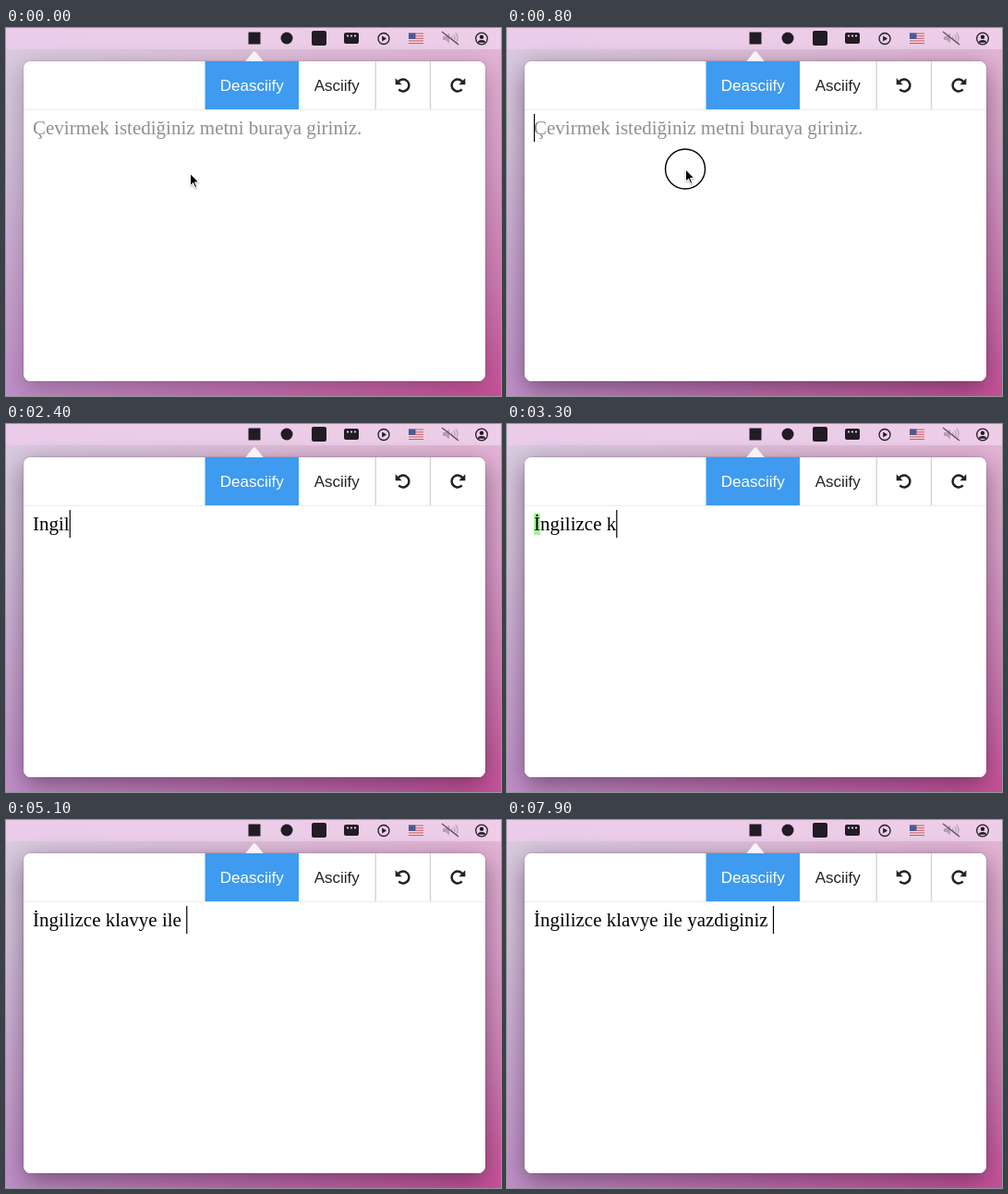
Recreate the animation shown at these times as an HTML page with a canvas. Size 536 by 398 pixels, loop 8 s.

```html
<!DOCTYPE html>
<html lang="tr">
<head>
<meta charset="utf-8">
<title>Typing demo</title>
<style>
  html, body { margin: 0; width: 100%; height: 100%; overflow: hidden; }
  #stage {
    position: relative; width: 536px; height: 398px; overflow: hidden;
    background: linear-gradient(#d9cbdf 6%, #d3c4da 30%, #c9a9d0 65%, #c08fc8);
  }
  #stage::before {
    content: ""; position: absolute; inset: 0;
    background: linear-gradient(#e3b3d4 6%, #dba0c8 35%, #d080b4 65%, #c74f96);
    -webkit-mask-image: linear-gradient(to right, transparent, #000);
    mask-image: linear-gradient(to right, transparent, #000);
  }
  canvas { position: absolute; left: 0; top: 0; width: 536px; height: 398px; }
</style>
</head>
<body>
<div id="stage"><canvas id="view"></canvas></div>
<script>
const W = 536, H = 398, LOOP = 8000;
const canvas = document.getElementById('view');
const ctx = canvas.getContext('2d');
const dpr = window.devicePixelRatio || 1;
canvas.width = W * dpr;
canvas.height = H * dpr;

const INK = '#211b23';
const SERIF = '21px "Liberation Serif", "Times New Roman", serif';
const SANS = '17px "Liberation Sans", Arial, sans-serif';
const PLACEHOLDER = 'Çevirmek istediğiniz metni buraya giriniz.';
const TYPED = 'İngilizce klavye ile yazdiginiz ';
const TEXT_X = 29, BASELINE = 115;

// Time at which each character of TYPED appears
const KEYS = [
  1600, 1800, 2100, 2300, 2400, 2600, 2600, 2900, 3000, 3100,
  3300, 3400, 3600, 3800, 4000, 4200, 4300,
  4800, 5000, 5000, 5100,
  5400, 5500, 5700, 6100, 6300, 6500, 6600, 6900, 7200, 7800, 7900
];
const CLICK = [800, 900], FIXED = [3300, 4400];
const CARET_OFF = [[0, 800], [1400, 1600], [7700, 7800]];

const within = (t, [a, b]) => t >= a && t < b;
const ramp = (t, a, b) => Math.min(1, Math.max(0, (t - a) / (b - a)));

function rect(x, y, w, h, color, r = 0) {
  ctx.fillStyle = color;
  ctx.beginPath();
  ctx.roundRect(x, y, w, h, r);
  ctx.fill();
}

function polygon(points, color) {
  ctx.fillStyle = color;
  ctx.beginPath();
  points.forEach(([x, y]) => ctx.lineTo(x, y));
  ctx.closePath();
  ctx.fill();
}

function disc(x, y, r, color) {
  ctx.fillStyle = color;
  ctx.beginPath();
  ctx.arc(x, y, r, 0, Math.PI * 2);
  ctx.fill();
}

function ring(x, y, r, width, color) {
  ctx.strokeStyle = color;
  ctx.lineWidth = width;
  ctx.beginPath();
  ctx.arc(x, y, r, 0, Math.PI * 2);
  ctx.stroke();
}

function text(str, x, y, font, color, align = 'left') {
  ctx.font = font;
  ctx.fontKerning = 'none';
  ctx.textAlign = align;
  ctx.fillStyle = color;
  ctx.fillText(str, x, y);
}

function flag(x, y) {
  rect(x, y, 16, 11.5, '#f3e6ec');
  for (let i = 0; i < 5; i++) rect(x, y + i * 2.6, 16, 1.2, '#cf5a6c');
  rect(x, y, 7.5, 6.5, '#4a5a92');
}

function mutedSpeaker() {
  const pale = '#b79db6';
  polygon([[473, 9], [476, 9], [480, 5.5], [480, 16.5], [476, 13], [473, 13]], pale);
  ctx.strokeStyle = pale;
  ctx.lineWidth = 1.2;
  [3, 6, 9].forEach(r => {
    ctx.beginPath();
    ctx.arc(480, 11, r, -0.7, 0.7);
    ctx.stroke();
  });
  ctx.strokeStyle = '#57485a';
  ctx.beginPath();
  ctx.moveTo(472, 4);
  ctx.lineTo(490, 18);
  ctx.stroke();
}

function userBadge(x, y) {
  ring(x, y, 6.3, 1.3, INK);
  disc(x, y - 1.7, 2.2, INK);
  ctx.beginPath();
  ctx.ellipse(x, y + 4.2, 4.2, 2.8, 0, Math.PI, Math.PI * 2);
  ctx.fill();
}

function menuBar() {
  const g = ctx.createLinearGradient(0, 0, W, 0);
  g.addColorStop(0, '#eaccea');
  g.addColorStop(1, '#edcde7');
  rect(0, 0, W, 23, g);
  rect(262.5, 4.5, 13, 13, INK);
  disc(304, 11, 6.5, INK);
  rect(331, 3, 16, 16, INK, 2);
  rect(366, 5, 16, 12, INK, 2);
  [370, 374, 378].forEach(x => disc(x, 8.5, 1.1, '#f0dff0'));
  ring(409, 11.5, 6, 1.3, INK);
  polygon([[407.2, 8.6], [412, 11.5], [407.2, 14.4]], INK);
  flag(436, 5.5);
  mutedSpeaker();
  userBadge(515, 11.5);
}

// Circular arrow; flip = -1 mirrors it
function turnArrow(x, y, flip) {
  ctx.save();
  ctx.translate(x, y);
  ctx.scale(flip, 1);
  ctx.strokeStyle = '#222';
  ctx.lineWidth = 2.5;
  ctx.beginPath();
  ctx.arc(0, 0, 6.4, Math.PI * 1.17, Math.PI * 2.76);
  ctx.stroke();
  polygon([[-8.3, -7.8], [-8.3, -0.8], [-1.3, -0.8]], '#222');
  ctx.restore();
}

function panelShadow(blur, dy, alpha) {
  ctx.save();
  ctx.shadowColor = `rgba(35, 15, 45, ${alpha})`;
  ctx.shadowBlur = blur * dpr;
  ctx.shadowOffsetY = dy * dpr;
  rect(19, 36, 500, 346, '#fff', 8);
  ctx.restore();
}

function panel(focus) {
  panelShadow(28, 8, 0.3 + 0.2 * focus);
  panelShadow(2, 0, 0.4);
  polygon([[259, 36.5], [267.5, 26], [269, 25], [270.5, 26], [279, 36.5]], '#f9f3f9');
  rect(19, 36, 500, 346, '#fff', 8);
  rect(19, 87.8, 500, 1, '#e9e9e9');
  rect(215.5, 36, 101.5, 52, '#3e9bef');
  [399.5, 458.8].forEach(x => rect(x, 36, 1.4, 52, '#d3d3d3'));
  text('Deasciify', 266.2, 68, SANS, '#fff', 'center');
  text('Asciify', 358.2, 68, SANS, '#222', 'center');
  turnArrow(430, 62, 1);
  turnArrow(489, 62, -1);
}

function editor(t) {
  const count = KEYS.filter(k => k <= t).length;
  let str = TYPED.slice(0, count);
  if (t < FIXED[0]) str = str.replace('İ', 'I');
  if (within(t, FIXED)) rect(29, 96.5, 7, 23.5, '#a8f39c');
  if (count) text(str, TEXT_X, BASELINE, SERIF, '#000');
  else text(PLACEHOLDER, TEXT_X, BASELINE, SERIF, '#8f8f8f');
  if (!CARET_OFF.some(span => within(t, span))) {
    ctx.font = SERIF;
    rect(TEXT_X + ctx.measureText(str).width, 93, 1.2, 30, '#000');
  }
}

function pointer(t) {
  if (t >= KEYS[0]) return;
  const p = 0.3 * ramp(t, 0, 200) + 0.7 * ramp(t, 300, 700);
  const x = 199 - 6 * p, y = 157 - 4.5 * p;
  if (within(t, CLICK)) ring(x, y, 21.5, 1.4, '#000');
  ctx.save();
  ctx.translate(x, y);
  ctx.shadowColor = 'rgba(0, 0, 0, .3)';
  ctx.shadowBlur = 2 * dpr;
  ctx.shadowOffsetY = dpr;
  polygon([[0, -1], [0, 14.6], [3.4, 11.6], [5.6, 16.6], [8.4, 15.4], [6.3, 10.5], [10.8, 10.2]], '#fff');
  ctx.shadowColor = 'transparent';
  polygon([[1, 1.4], [1, 12.4], [3.8, 9.9], [6.1, 15.2], [7.1, 14.8], [4.9, 9.5], [8.6, 9.3]], '#000');
  ctx.restore();
}

function draw() {
  const t = Math.floor(performance.now() % LOOP / 100) * 100;
  ctx.setTransform(dpr, 0, 0, dpr, 0, 0);
  ctx.clearRect(0, 0, W, H);
  menuBar();
  panel(ramp(t, 300, 800));
  editor(t);
  pointer(t);
  requestAnimationFrame(draw);
}
draw();
</script>
</body>
</html>
```
